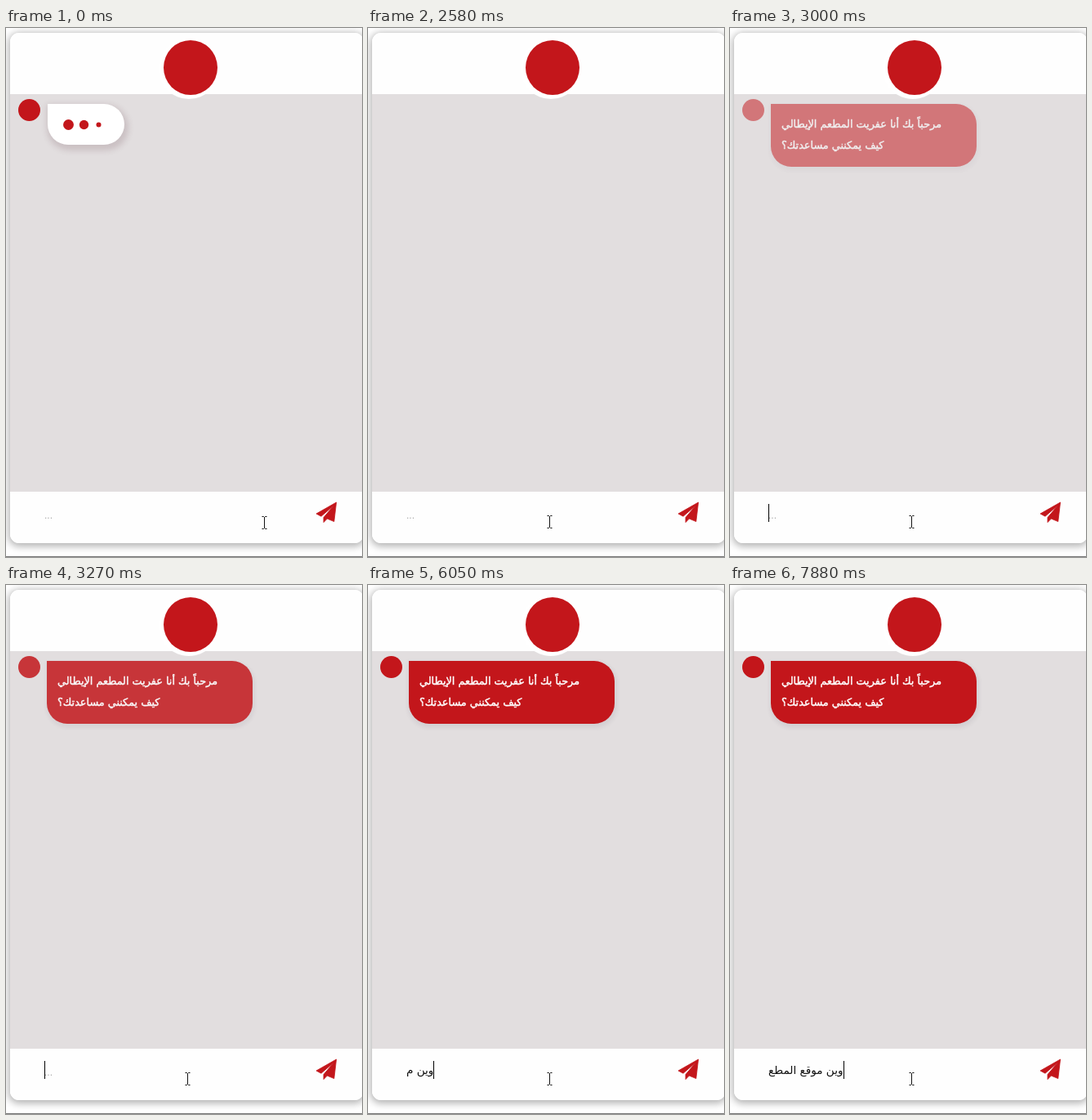
Write an HTML page that moves like this. It is 436x648 px and loops after 8 s.

```html
<!DOCTYPE html>
<html lang="ar">
<head>
<meta charset="utf-8">
<title>Chat</title>
<style>
  html, body { margin: 0; width: 100%; height: 100%; overflow: hidden; background: #fff; }
  body { position: relative; --red: #c3161b; font-family: "DejaVu Sans", sans-serif; }
  body * { position: absolute; box-sizing: border-box; }
  .card { left: 5px; top: 6px; width: 433px; height: 625px; border-radius: 11px; overflow: hidden;
    background: #fefefe; }
  .shade { left: 5px; top: 6px; width: 433px; height: 625px; border-radius: 11px;
    box-shadow: 0 2px 10px 2px rgba(0, 0, 0, .3); }
  .log { left: 0; top: 75px; width: 100%; height: 487px; background: #e2dedf; }
  .rule { left: 0; top: 647px; width: 436px; height: 1px; background: #777; }
  .holder { left: 187px; top: 13px; width: 74px; height: 74px; border-radius: 50%; background: #fff; }
  .badge { left: 193px; top: 15px; width: 66px; height: 67px; border-radius: 50%; background: var(--red); }
  .avatar { left: 15px; top: 87px; width: 27px; height: 27px; border-radius: 50%; background: var(--red); }
  .bubble { top: 93px; border-radius: 0 25px 25px 25px; }
  #typing .bubble { left: 51px; width: 94px; height: 50px; background: #fff;
    box-shadow: 2px 4px 7px 3px rgba(90, 50, 60, .17); }
  .dot { top: 112px; width: 13px; height: 13px; border-radius: 50%; background: var(--red); }
  #reply .bubble { left: 50px; width: 252px; height: 77px; padding: 12px 13px; background: var(--red);
    box-shadow: 1px 3px 5px 2px rgba(80, 70, 90, .09);
    color: #fff; font-size: 12.8px; line-height: 26px; white-space: pre; -webkit-text-stroke: .45px #fff; }
  .hint { left: 47px; top: 589px; font: 12px/16px "Liberation Sans", sans-serif; color: #aaa; }
  .field { left: 47px; top: 583px; height: 22px; display: flex; }
  .field * { position: static; }
  #typed { font-size: 13.6px; line-height: 22px; white-space: pre; color: #111; }
  #caret { width: 1px; height: 22px; background: #000; }
  svg { left: 0; top: 0; width: 436px; height: 648px; }
</style>
</head>
<body>
  <div class="shade"></div>
  <div class="card"><div class="log"></div></div>
  <div class="rule"></div>
  <div class="holder"></div>
  <div class="badge"></div>

  <div id="typing">
    <div class="avatar"></div>
    <div class="bubble"></div>
    <div class="dot" style="left:70px"></div>
    <div class="dot" style="left:89px"></div>
    <div class="dot" style="left:107px"></div>
  </div>

  <div id="reply">
    <div class="avatar"></div>
    <div class="bubble">مرحباً بك أنا عفريت المطعم الإيطالي
كيف يمكنني مساعدتك؟</div>
  </div>

  <div class="hint" id="hint">...</div>
  <div class="field"><span id="typed"></span><div id="caret"></div></div>

  <svg viewBox="0 0 436 648">
    <path fill="#c3161b" stroke="#c3161b" stroke-width=".8" stroke-linejoin="round"
      d="M404.6 581L380 595l6 3.2L401.4 585 389 599.6V605.6l4.4-4.5 8.4 3.5z"/>
    <path id="pointer" fill="none" stroke="#111" stroke-width="1"
      d="M-3-7.5H-1M1-7.5H3M-1-7.5L0-6.5 1-7.5M0-7V7M-3 7.5H-1M1 7.5H3M-1 7.5L0 6.5 1 7.5"/>
  </svg>

<script>
const LOOP = 8000;
const $ = id => document.getElementById(id);
const dots = [...document.querySelectorAll('.dot')];
const clamp = v => Math.min(1, Math.max(0, v));
const ease = v => (1 - Math.cos(Math.PI * clamp(v))) / 2;
const progress = (t, from, to) => clamp((t - from) / (to - from));

const SENTENCE = 'وين موقع المطع';
// [time, letters entered]
const KEYS = [[4550, 1], [4670, 2], [4790, 3], [5090, 4], [6050, 5], [6190, 6], [6330, 7],
  [6610, 8], [6750, 9], [6890, 10], [7170, 12], [7450, 13], [7880, 14]];
const CARET_ON = [[1790, 2310], [2850, 3410], [3870, 4430], [4550, 5620], [6050, LOOP]];

function dotScale(ms) {
  const phase = (ms % 1370) / 1370;
  return phase < .4 ? ease(phase / .4) : 1 - ease((phase - .4) / .4);
}

function draw(t) {
  $('typing').style.visibility = t < 2430 ? 'visible' : 'hidden';
  dots.forEach((dot, i) => {
    dot.style.transform = `scale(${dotScale(t + 580 - i * 160)})`;
  });

  $('reply').style.opacity = progress(t, 2580, 3400);

  const move = ease(progress(t, 120, 1100));
  $('pointer').setAttribute('transform', `translate(${316.5 - 94 * move} ${606 - move})`);

  const count = KEYS.reduce((n, [at, letters]) => t >= at ? letters : n, 0);
  const text = SENTENCE.slice(0, count);
  if ($('typed').textContent !== text) $('typed').textContent = text;
  $('hint').style.visibility = count ? 'hidden' : 'visible';
  const lit = CARET_ON.some(([on, off]) => t >= on && t < off);
  $('caret').style.visibility = lit ? 'visible' : 'hidden';
}

const start = performance.now();
function tick() {
  draw((performance.now() - start) % LOOP);
  requestAnimationFrame(tick);
}
tick();
</script>
</body>
</html>
```
